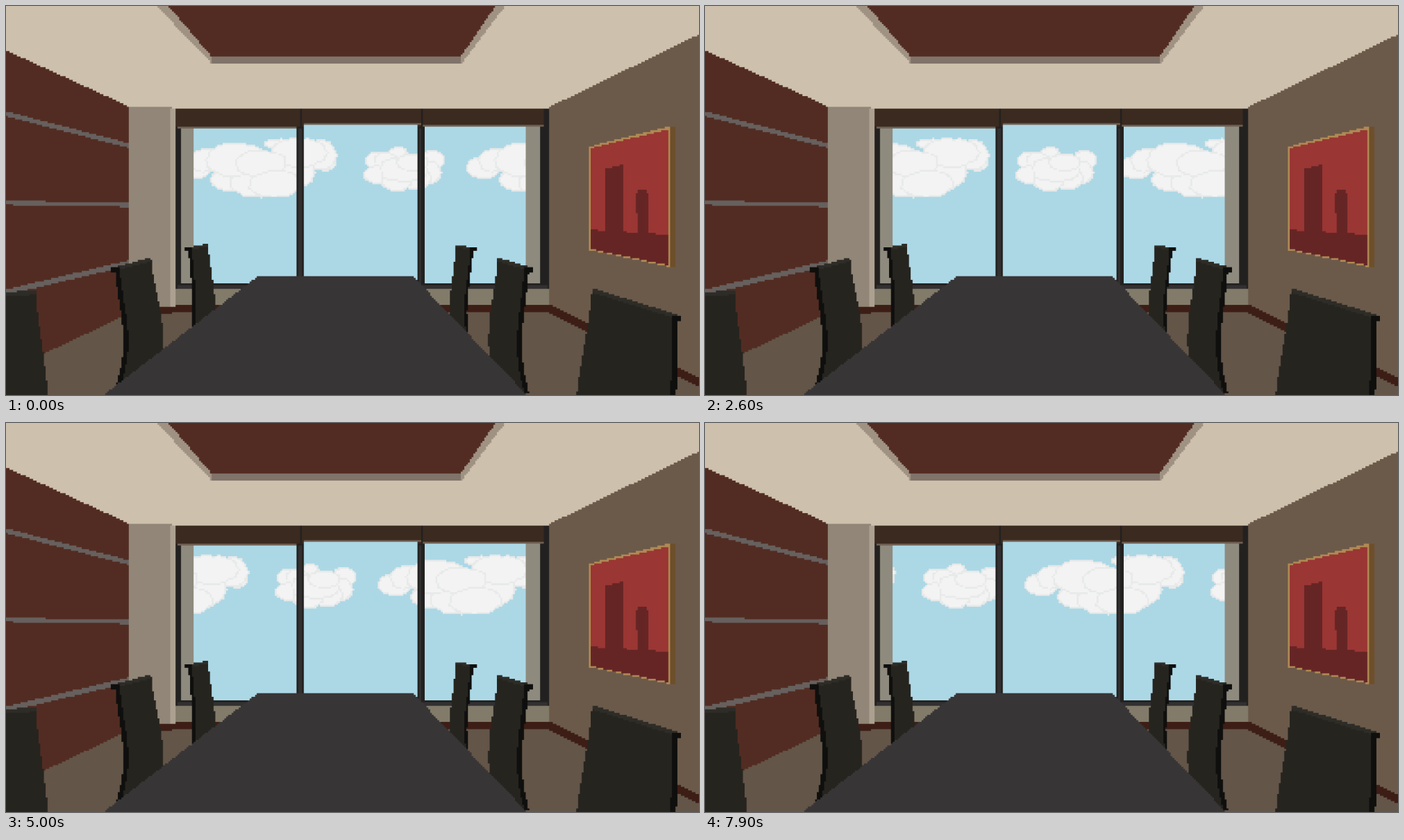
Write an HTML page with a canvas that moves like this. It is 998x561 px and loops after 8000 ms.

```html
<!DOCTYPE html>
<html lang="en">
<head>
<meta charset="utf-8">
<title>Meeting room</title>
<style>
html, body { margin: 0; width: 100%; height: 100%; overflow: hidden; background: #cdc0ac; }
canvas { display: block; width: 998px; height: 561px; }
</style>
</head>
<body>
<canvas id="stage" width="998" height="561"></canvas>
<script>
const W = 384, H = 216, CELL = 998 / W, ZOOM = 5;
const PERIOD = 160, TILE_X = 94;
const SKY = '#acd8e6', WOOD = '#522c22', SKIRT = '#3d1e16', STONE = '#918677';
const STRIPE = '#66605e', REVEAL = '#8e8a7e', FRAME = '#232120', FRAME_LIT = '#323031';
const SEAT = '#26241f', SEAT_TOP = '#2e2c27', SEAT_EDGE = '#0f0f0e';

function layer(w, h) {
  const c = document.createElement('canvas');
  c.width = w;
  c.height = h;
  return c.getContext('2d');
}

let seed = 7;
const random = () => (seed = seed * 16807 % 2147483647) / 2147483647;

// "x,y x,y" or [[x, y]] in stage pixels, returned in cells
function toCells(shape) {
  const pts = typeof shape === 'string' ? shape.split(' ').map(p => p.split(',')) : shape;
  return pts.map(p => p.map(v => v / CELL));
}

// Hard-edged polygon, sampled at cell centres
function poly(ctx, color, shape) {
  const pts = toCells(shape);
  ctx.fillStyle = color;
  for (let row = 0; row < H; row++) {
    const y = row + 0.5, xs = [];
    pts.forEach(([x1, y1], i) => {
      const [x2, y2] = pts[(i + 1) % pts.length];
      if ((y1 <= y) !== (y2 <= y)) xs.push(x1 + (y - y1) / (y2 - y1) * (x2 - x1));
    });
    xs.sort((a, b) => a - b);
    for (let i = 0; i + 1 < xs.length; i += 2) {
      const a = Math.ceil(xs[i] - 0.5), b = Math.ceil(xs[i + 1] - 0.5);
      if (b > a) ctx.fillRect(a, row, b - a, 1);
    }
  }
}

function box(ctx, color, x1, y1, x2, y2) {
  const [a, b, c, d] = [x1, y1, x2, y2].map(v => Math.round(v / CELL));
  ctx.fillStyle = color;
  ctx.fillRect(a, b, c - a, d - b);
}

// Slanted strip of constant height
function band(ctx, color, x1, y1, x2, y2, h) {
  poly(ctx, color, [[x1, y1], [x2, y2], [x2, y2 + h], [x1, y1 + h]]);
}

// Ragged ellipse with a one-cell rim
function puff(ctx, x, y, rx, ry) {
  const n = Math.round((rx + ry) / 2.5), ring = [];
  for (let i = 0; i < n; i++) {
    const a = i / n * Math.PI * 2, k = 0.93 + random() * 0.12;
    ring.push([x + Math.cos(a) * rx * k, y + Math.sin(a) * ry * k]);
  }
  const inset = ring.map(([px, py]) =>
    [px - CELL * (px - x) / rx, py - CELL * (py - y) / ry]);
  poly(ctx, '#e8e9e9', ring);
  poly(ctx, '#f3f3f3', inset);
}

function cloud(ctx, shift, puffs) {
  ctx.save();
  ctx.translate(shift - TILE_X, 0);
  puffs.forEach(p => puff(ctx, ...p));
  ctx.restore();
}

function makeClouds() {
  const ctx = layer(PERIOD, H);
  cloud(ctx, -101, [
    [657, 199, 24, 8], [722, 225, 17, 14], [715, 215, 25, 22], [606, 211, 22, 13],
    [535, 233, 26, 17], [548, 223, 22, 18], [585, 249, 29, 18], [675, 240, 33, 26],
    [622, 255, 37, 22], [595, 222, 46, 25], [685, 212, 41, 22], [630, 228, 38, 21],
    [650, 257, 39, 21]
  ]);
  cloud(ctx, 26, [
    [466, 224, 17, 14], [547, 222, 17, 15], [497, 213, 14, 11], [468, 243, 21, 14],
    [541, 240, 19, 18], [480, 223, 18, 13], [522, 248, 23, 18], [495, 252, 23, 16],
    [505, 236, 36, 19], [518, 226, 24, 14]
  ]);
  return ctx.canvas;
}

function drawShell(c) {
  box(c, '#cdc0ac', 0, 0, 998, 561);
  box(c, '#635548', 0, 437, 998, 561);

  // Ceiling recess
  poly(c, '#a09283', '217,0 719,0 657,82 295,82');
  poly(c, WOOD, '234,0 705,0 655,73 296,73');
  box(c, '#7f736a', 296, 73, 656, 82);

  // Back wall and pillar
  box(c, '#827b6a', 244, 400, 783, 433);
  box(c, SKIRT, 240, 432, 784, 441);
  box(c, STONE, 177, 146, 238, 434);
  box(c, '#aca191', 237, 148, 245, 434);
  box(c, SKIRT, 177, 434, 240, 444);

  // Side walls
  poly(c, WOOD, '0,64 177,145 177,444 52,503 0,528');
  band(c, STRIPE, 0, 152, 177, 198, 7);
  band(c, STRIPE, 0, 281, 177, 284, 6);
  band(c, STRIPE, 0, 409, 177, 367, 8);
  poly(c, '#6b5a4a', '782,146 998,41 998,545 782,436');
  band(c, SKIRT, 782, 430, 998, 536, 13);
}

function drawPainting(c) {
  const dark = '#662525';
  poly(c, '#6d4f2b', '955,174 963,175 963,376 955,376');
  poly(c, '#b08a54', '840,203 957,173 957,377 840,352');
  poly(c, '#9a3633', '843,205 954,178 954,374 843,351');
  poly(c, dark, '843,323 954,330 954,374 843,351');
  poly(c, dark, '863,235 888,229 888,328 863,326');
  box(c, dark, 910, 266, 923, 330);
  box(c, dark, 907, 269, 925, 299);
  box(c, dark, 920, 299, 925, 330);
}

function drawWindow(c) {
  const panes = [[270, 177, 419], [428, 171, 593], [603, 174, 748]];
  box(c, FRAME, 245, 148, 782, 407);
  box(c, FRAME_LIT, 247, 403, 780, 407);
  box(c, '#3a2a1f', 245, 148, 775, 174);
  box(c, REVEAL, 251, 176, 271, 400);
  box(c, REVEAL, 748, 174, 769, 400);
  box(c, '#6f6053', 247, 174, 424, 177);
  box(c, '#6f6053', 428, 169, 597, 172);
  box(c, '#6f6053', 601, 171, 775, 174);
  for (const x of [419, 593]) {
    box(c, FRAME, x, 174, x + 9, 403);
    box(c, FRAME_LIT, x + 3, 177, x + 6, 403);
    box(c, FRAME, x + 5, 148, x + 8, 177);
  }
  for (const [x1, y, x2] of panes) {
    const [a, b, d, e] = [x1, y, x2, 401].map(v => Math.round(v / CELL));
    c.clearRect(a, b, d - a, e - b);
  }
}

// Chair back between an outer (aisle) and inner (table) side, both bowed toward the table
function chair(c, outer, inner, outerTop, innerTop, bottom, outerBow, innerBow, edge) {
  const dir = Math.sign(inner - outer);
  const side = (x, top, bow) => Array.from({ length: 25 }, (_, i) => {
    const u = i / 24;
    return [x + dir * bow * Math.sin(Math.PI * u ** 1.4), top + (bottom - top) * u];
  });
  const left = side(outer, outerTop, outerBow);
  const right = side(inner, innerTop, innerBow);
  const rim = left.map(([x, y]) => [x + dir * edge, y]);
  const lip = outer - dir * 5;
  poly(c, SEAT, [...left, ...right.reverse()]);
  band(c, SEAT_TOP, lip, outerTop, inner, innerTop, edge * 0.8);
  poly(c, SEAT_EDGE, [...left, ...rim.reverse()]);
  band(c, SEAT_EDGE, lip, outerTop, outer + dir * edge / 2, outerTop, edge);
}

function drawChairs(c) {
  chair(c, 263, 291, 349, 343, 490, 6, 10, 5);
  chair(c, 673, 648, 349, 345, 500, 9, 9, 4);
  chair(c, 157, 209, 378, 363, 552, 12, 17, 7);
  chair(c, 753, 708, 378, 363, 558, 10, 13, 7);
  chair(c, -60, 43, 418, 410, 700, 0, 18, 8);
  chair(c, 967, 844, 447, 407, 720, 2, 24, 8);
}

function makeRoom() {
  const c = layer(W, H);
  drawShell(c);
  drawPainting(c);
  drawWindow(c);
  drawChairs(c);
  poly(c, '#383536', '364,389 585,389 750,561 141,561');
  return c.canvas;
}

const clouds = makeClouds(), room = makeRoom();
const big = layer(W * ZOOM, H * ZOOM);
const stage = document.getElementById('stage').getContext('2d');
big.imageSmoothingEnabled = false;
big.scale(ZOOM, ZOOM);
stage.imageSmoothingQuality = 'high';

function draw(shift) {
  big.fillStyle = SKY;
  big.fillRect(0, 0, W, H);
  for (let k = 0; k < 3; k++) big.drawImage(clouds, TILE_X - shift + k * PERIOD, 0);
  big.drawImage(room, 0, 0);
  stage.drawImage(big.canvas, 0, 0, 998, 561);
}

// One cell per 100 ms, resting for one step halfway through
const start = performance.now();
let shown = -1;
function tick() {
  const step = Math.floor((performance.now() - start) % 8000 / 100);
  const shift = step < 40 ? step : step - 1;
  if (shift !== shown) draw(shown = shift);
  requestAnimationFrame(tick);
}
tick();
</script>
</body>
</html>
```
